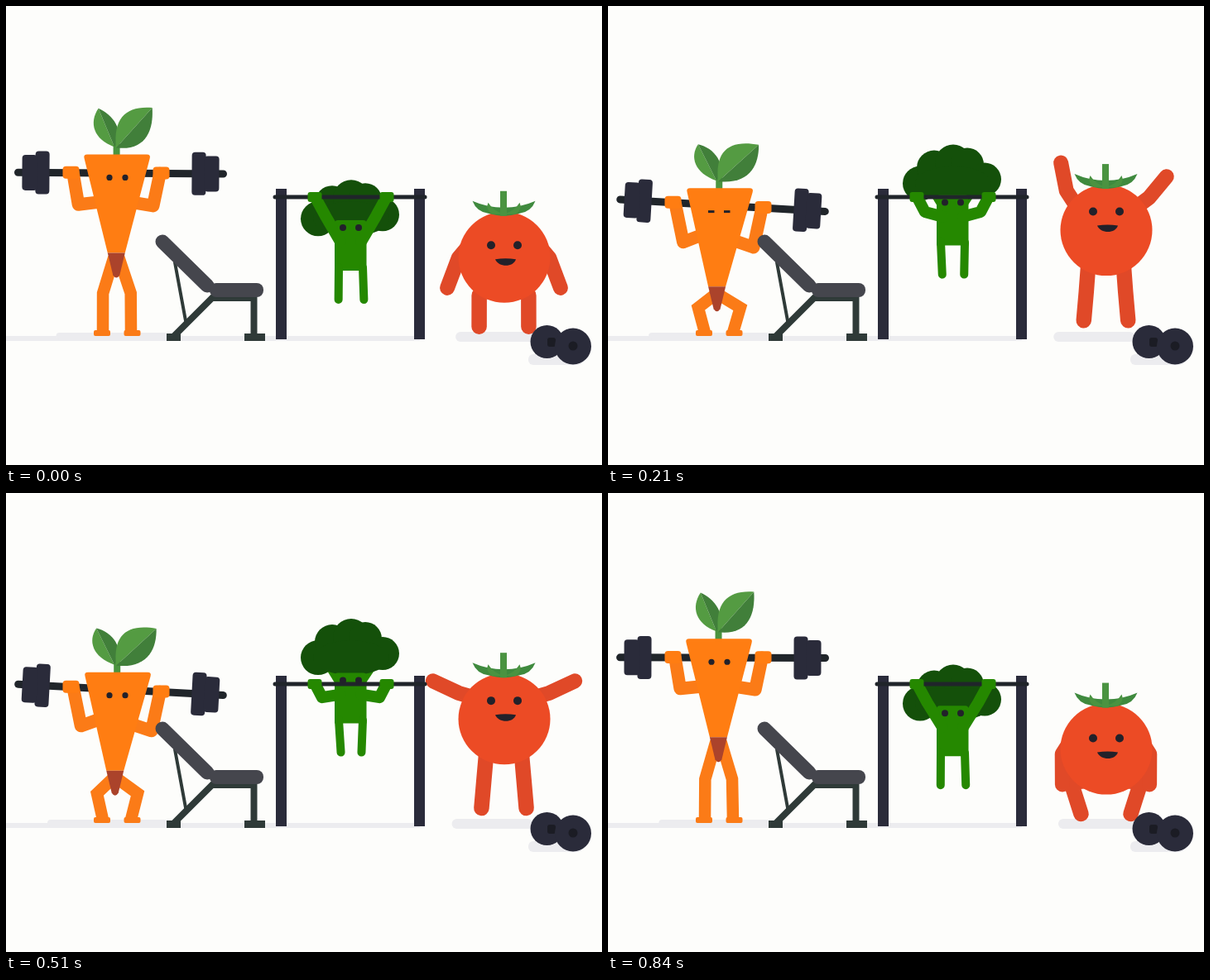
An HTML page with a canvas that plays this animation: 720 px wide and 555 px high, repeating every 870 ms.

```html
<!DOCTYPE html>
<html lang="en">
<head>
<meta charset="utf-8">
<title>Vegetable gym</title>
<style>
  html, body { margin: 0; width: 100%; height: 100%; overflow: hidden; background: #fdfdfb; }
  canvas { display: block; }
</style>
</head>
<body>
<canvas id="stage" width="720" height="555"></canvas>
<script>
const ctx = document.getElementById('stage').getContext('2d');
const LOOP = 870, STEP = 30, JUMP = LOOP / 2;
const PAPER = '#fdfdfb', IRON = '#2a2b3a', BAR = '#20252a', SHADOW = '#ececef', PUPIL = '#22212a';
const CARROT = '#ff7d12', CARROT_LIMB = '#fb7b17', TIP = '#ab432b';
const LEAF_LIGHT = '#549b42', LEAF_DARK = '#417f3a';
const STALK = '#258800', FLORET = '#14500a';
const TOMATO = '#ec4b25', TOMATO_LIMB = '#e04928';

const mix = (a, b, u) => a + (b - a) * u;
const ease = u => u * u * (3 - 2 * u);

// Rises 0 to 1 between start and peak, falls back by end, then rests; repeats every period.
function pulse(t, period, start, peak, end) {
  const p = ((t - start) % period + period) % period, up = peak - start;
  return p < up ? ease(p / up) : ease(Math.max(0, 1 - (p - up) / (end - peak)));
}

function line(color, width, points, cap = 'round', join = 'round') {
  ctx.strokeStyle = color;
  ctx.lineWidth = width;
  ctx.lineCap = cap;
  ctx.lineJoin = join;
  ctx.beginPath();
  points.forEach(p => ctx.lineTo(...p));
  ctx.stroke();
}
function box(color, x, y, w, h, r = 0) {
  ctx.fillStyle = color;
  ctx.beginPath();
  ctx.roundRect(x, y, w, h, r);
  ctx.fill();
}
function oval(color, x, y, rx, ry = rx) {
  ctx.fillStyle = color;
  ctx.beginPath();
  ctx.ellipse(x, y, rx, ry, 0, 0, 7);
  ctx.fill();
}
function shape(color, path) {
  ctx.fillStyle = color;
  ctx.fill(new Path2D(path));
}

function drawGround(squat, lift) {
  box(SHADOW, 0, 399, 500, 6);
  box(SHADOW, 62 - 17 * squat, 395, 133 + 17 * squat, 8, 4);
  box(SHADOW, 544 - 9 * lift, 394, 98, 12, 6);
  box(SHADOW, 631, 421, 66, 13, 6);
}

function drawLeaves(s) {
  const lx = 112 - 4 * s, ly = -56 + 4 * s, rx = 176 + 8 * s, ry = -57 + 6 * s;
  box('#4a943f', 129.5 + s, -13, 8, 14);
  shape(LEAF_LIGHT, `M131 -9 C${106 - 2 * s} -18 ${100 - 2 * s} -38 ${lx} ${ly} Z`);
  shape(LEAF_DARK, `M131 -9 L${lx} ${ly} C128 -49 145 -28 131 -9 Z`);
  shape(LEAF_LIGHT, `M133 -8 C129 -45 146 -59 ${rx} ${ry} Z`);
  shape(LEAF_DARK, `M133 -8 L${rx} ${ry} C${178 + 6 * s} -28 ${168 + 4 * s} -4 133 -8 Z`);
}

function drawBarbell(y, angle) {
  ctx.save();
  ctx.translate(138.5, y);
  ctx.rotate(angle);
  line(BAR, 9, [[-124, 0], [124, 0]]);
  for (const side of [-1, 1]) {
    box(IRON, side * 94.5 - 8.5, -26, 17, 52, 4);
    box(IRON, side * 110 - 9, -21.5, 18, 43, 4);
  }
  ctx.restore();
}

function drawCarrot(s, closed) {
  const top = 174 + 60.5 * s, floor = 399 - top;
  const barY = 23 - 2.5 * s, tilt = 0.077 * s;
  const hand = x => barY + (x - 138.5) * tilt;
  const collar = 134 + 1.5 * s, neck = 133.5 - 2.5 * s, hip = 124 + 7 * s;

  ctx.save();
  ctx.translate(0, top);
  drawBarbell(barY, Math.atan(tilt));

  const kneeY = floor - 54 + 26 * s;
  for (const [hipX, kneeX, footX] of [
    [neck - 3, 117.5 - 4 * s - 9.5 * s * s, 117],
    [neck + 3, 149.5 + 13.5 * s, 151]
  ]) {
    line(CARROT_LIMB, 14.5, [[hipX, hip], [kneeX, kneeY], [footX, floor - 4]], 'butt', 'miter');
    box(CARROT_LIMB, footX - (footX < 134 ? 11 : 8.5), floor - 7, 20, 7, 2);
  }

  line(CARROT_LIMB, 15.5, [[81, hand(79)], [87 + 5 * s, 60 + 7 * s], [110, 58]]);
  line(CARROT_LIMB, 15.5, [[186, hand(187)], [178 - 3 * s, 61 + 14 * s], [157 - 4 * s, 58 + 8 * s]]);
  for (const x of [78.5, 187.5]) box(CARROT, x - 10, hand(x) - 8, 20, 15, 4);

  drawLeaves(s);
  shape(CARROT, `M${collar - 36} 0 H${collar + 36} Q${collar + 41} 0 ${collar + 39.5} 5
    L${neck + 10.5} 119 H${neck - 10.5} L${collar - 39.5} 5 Q${collar - 41} 0 ${collar - 36} 0 Z`);
  shape(TIP, `M${neck - 10.5} 119 H${neck + 10.5} L${neck + 4} 146 Q${neck} 152 ${neck - 4} 146 Z`);

  for (const x of [125, 144])
    if (closed) box(PUPIL, x - 4, 27, 7.5, 3);
    else oval(PUPIL, x, 28, 3.6);
  ctx.restore();
}

function drawBench() {
  const frame = '#2f3a38', pad = '#45464d';
  line(frame, 4, [[204, 310], [218, 386]]);
  line(frame, 8, [[202, 400], [249, 353], [299.5, 353], [299.5, 400]], 'butt', 'miter');
  box(frame, 194, 396, 17, 9);
  box(frame, 288, 396, 25, 9);
  line(pad, 17, [[189, 285], [243, 338]]);
  box(pad, 246, 335, 65, 17, 8);
}

function drawBroccoli(rise) {
  const top = mix(213, 133, rise), eye = mix(270, 213, rise);
  const sides = [x => x, x => 833 - x];
  for (const x of [326, 493]) box(IRON, x, 221, 13, 182);

  shape(STALK, `M384 ${eye - 18} H449 L435 ${eye + 3} H397 Z`);
  for (const [x, y, r] of [[377, 47, 21], [394, 28, 21], [417, 22, 22], [434, 24, 20], [455, 42, 20]])
    oval(FLORET, x, top + y, r);
  oval(FLORET, 417, top + 47, 46, 21);

  box(STALK, 397, eye - 9, 38.5, 61, [4, 4, 0, 0]);
  for (const side of sides) {
    line(STALK, 10, [[side(402), eye + 48], [side(401 + 4 * rise) + 0.5, eye + 87]]);
    line(STALK, 14, [[side(374), 232], [side(mix(386, 380.5, rise)), mix(254, 245, rise)], [side(404), eye + 17]]);
  }

  line(BAR, 5, [[325, 231], [506, 231]]);
  for (const side of sides) box(STALK, side(373) - 8.5, 225, 17, 12, 3);
  for (const x of [407, 426]) oval(PUPIL, x, eye, 4);
}

function drawTomato(p, lift) {
  const y = mix(310, 249, lift), air = lift * lift;
  ctx.save();
  ctx.translate(601.5, y);

  // Angles run from straight down, outwards and up.
  const polar = (deg, r) => [-r * Math.sin(deg * Math.PI / 180), r * Math.cos(deg * Math.PI / 180)];
  const knee = [-43 + 16 * Math.min(1, 8 * lift) + 8 * air, 350 - 10 * air - y];
  const foot = [-30 + 8 * air, 388 - 19 * air - y];
  for (const [side, settle] of [[1, 360], [-1, 300]]) {
    const swing = pulse(p, JUMP, -40, 162, settle), reach = 1 - (1 - swing) ** 4;
    ctx.save();
    ctx.scale(side, 1);
    line(TOMATO_LIMB, 18.5, [[-21, 38], knee, foot]);
    line(TOMATO_LIMB, 18, [[-33, -25], polar(83 + 61 * swing, 53 + 17 * swing), polar(50 + 113 * swing, 67 + 31 * reach)]);
    ctx.restore();
  }

  oval(TOMATO, 0.5, 0, 55.5, 55);
  for (const side of [1, -1]) {
    ctx.scale(side, 1);
    shape('#3f8a3e', 'M0 -60 Q20 -60 38 -68 Q33 -55 19 -53 Q8 -50 0 -50 Z');
    shape('#4a9341', 'M0 -52 Q13 -56 19 -66 Q23 -58 14 -52 Z');
  }
  ctx.scale(-1, -1);
  ctx.scale(-1, -1);
  ctx.restore();
  box('#4a9341', 597, y - 80, 8, 30);

  const eye = y - 13 - 15 * lift;
  for (const x of [586, 618]) oval(PUPIL, x, eye, 5);
  shape(PUPIL, `M591 ${eye + 17} Q603.5 ${eye + 15} 616 ${eye + 17}
    C613 ${eye + 27} 595 ${eye + 27} 591 ${eye + 17} Z`);
}

function drawDumbbell() {
  const hub = '#1b1c24';
  oval(IRON, 653.5, 406, 20);
  box(hub, 654, 401, 10, 11, 3);
  oval(IRON, 685, 411.5, 22);
  oval(hub, 685, 411, 5.5);
}

function draw(now) {
  const t = Math.floor(now % LOOP / STEP) * STEP;
  const squat = (1 - Math.cos(2 * Math.PI * (t + 84) / LOOP)) / 2;
  const lift = pulse(t, JUMP, -40, 162, 280);
  box(PAPER, 0, 0, 720, 555);
  drawGround(squat, lift);
  drawCarrot(squat, t >= 90 && t < 360);
  drawBench();
  drawTomato(t, lift);
  drawBroccoli(pulse(t, LOOP, 90, 310, 940));
  drawDumbbell();
}

let start;
function tick(now) {
  start ??= now;
  draw(now - start);
  requestAnimationFrame(tick);
}
draw(0);
requestAnimationFrame(tick);
</script>
</body>
</html>
```
